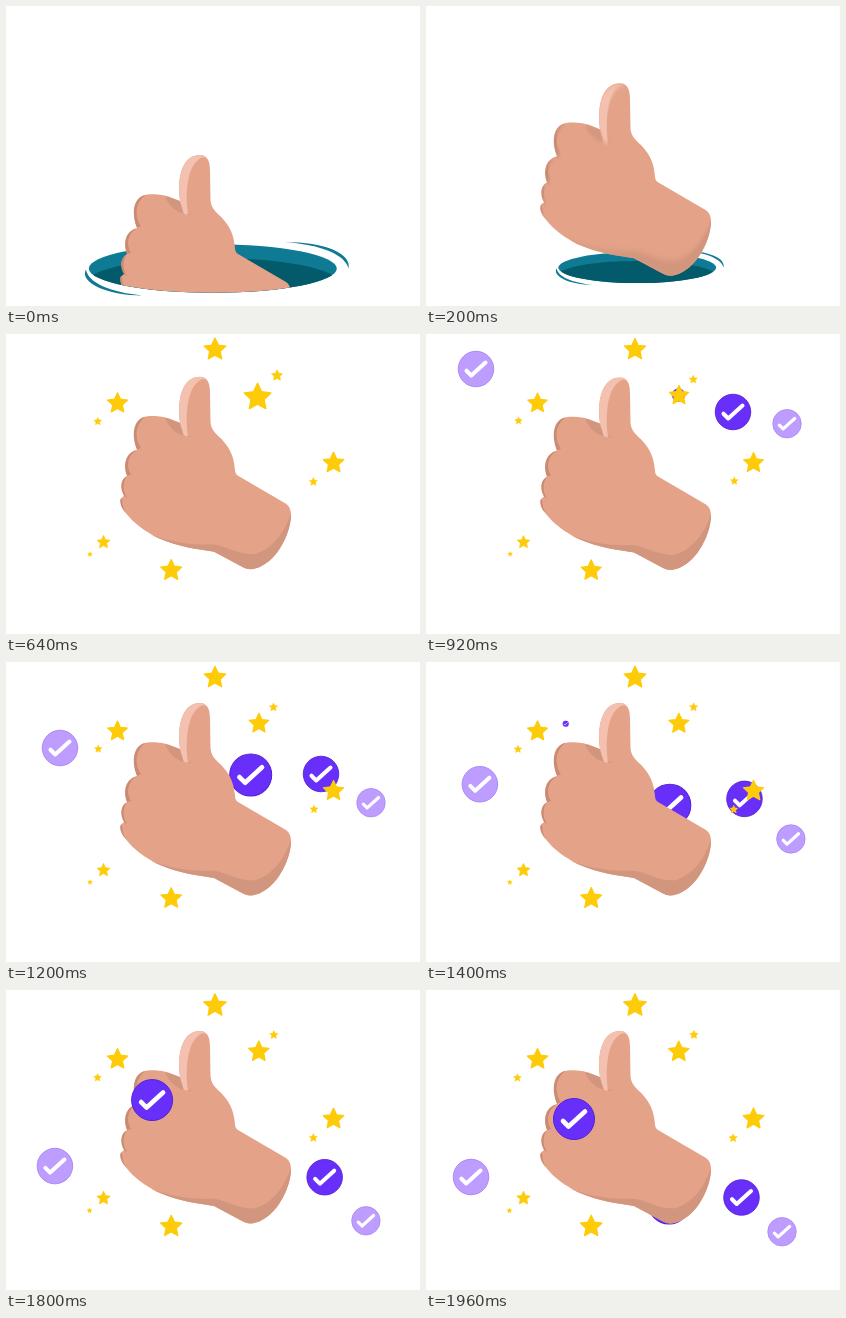
Recreate the animation shown at these times as an HTML page. Size 414 by 300 pixels, loop 2 s.

```html
<!DOCTYPE html>
<html lang="en">
<head>
<meta charset="utf-8">
<title>Thumbs up</title>
<style>
  html, body { margin: 0; width: 100%; height: 100%; overflow: hidden; background: #fff; }
  svg { display: block; width: 414px; height: 300px; }
  .star { fill: #fecb08; stroke: #fecb08; stroke-width: .1; stroke-linejoin: round; }
  .dark { fill: #692ffa; stroke: #5521d6; }
  .light { fill: #bd9dff; stroke: #a87ff3; }
  .tick { fill: none; stroke: #fff; stroke-width: 4.6; stroke-linecap: round; stroke-linejoin: round; }
</style>
</head>
<body>
<svg viewBox="0 0 414 300">
  <defs>
    <clipPath id="mouth">
      <rect width="414" height="262"/>
      <ellipse id="mouthRim" cx="206.8" cy="262.5" rx="124" ry="24.3"/>
    </clipPath>
    <clipPath id="inside"><ellipse cx="206.8" cy="262.5" rx="124" ry="24.3"/></clipPath>
    <path id="skin" d="M174 87C171 66 175 41 194 41C202 41 204 48 204 57L204.500 86
      C205 96 212 99 217 105C226 115 228 124 229 134Q229 138 232 140L280 168Q285 171 285 180
      C284 202 268 228 250 232.500Q243 235 237 231.500L208 216C192 213 174 212 151.500 202
      C140 196 128 188 120 177.500Q113 170 114.500 163L118 160C114 153 114 144 121 140
      C117 130 119 117 131 114C126 102 126 86 137 81.500C145 79 158 81 164 83Z"/>
    <clipPath id="within"><use href="#skin"/></clipPath>
    <filter id="blur" x="-5%" y="-10%" width="110%" height="120%" color-interpolation-filters="sRGB">
      <feGaussianBlur id="blurAmount" stdDeviation="0 0"/>
    </filter>
  </defs>

  <g id="hole">
    <g clip-path="url(#inside)">
      <rect x="80" y="236" width="254" height="52" fill="#0e7a94"/>
      <ellipse cx="206.5" cy="276" rx="125" ry="24" fill="#035a6b"/>
    </g>
    <g fill="#0e7a94">
      <path d="M278 236C320 236 346 248 342.500 262.500C339 248 314 238.500 278 236Z"/>
      <path d="M80 263.500C73 276 100 289.500 137 289.500C105 286.500 82 277 80 263.500Z"/>
    </g>
  </g>

  <g id="back"></g>
  <g id="stars"></g>

  <g clip-path="url(#mouth)">
    <g id="hand">
      <use href="#skin" fill="#e4a388"/>
      <g clip-path="url(#within)">
        <g id="shading">
          <g fill="#d2967e">
            <path d="M140 197C163 206 184 210 205 208.500C219 209 231 219 248 218.500
              C267 214 280 194 285 177L292 200L250 240L237 235L208 219L151 205Z"/>
            <path d="M159 82L174 87L178 99L188 101C172 101 163 93 159 82Z"/>
          </g>
          <g fill="#c98b74">
            <path d="M140 80.500C126 84 126 102 131 114L135 112C129 104 128 89 140 80.500Z"/>
            <path d="M131 114C119 117 117 130 121 140L125 139C120 131 121 120 131 114Z"/>
            <path d="M121 140C114 144 114 153 118 160L121 162C116 154 117 146 121 140Z"/>
            <path d="M114.500 163Q113 170 120 177.500C117 172 116 168 116.500 164Z"/>
          </g>
          <path fill="#f4c0af" d="M194 41C175 41 171 66 174 87L177.500 99Q179 101 182 100.500
            C179 80 181 52 194 44.500Q198 42 201 45Q199 41 194 41Z"/>
        </g>
      </g>
    </g>
  </g>

  <g id="front"></g>
</svg>
<script>
const LOOP = 2000, STEP = 40;
const $ = id => document.getElementById(id);
const clamp = p => Math.min(1, Math.max(0, p));
const span = (t, a, b) => clamp((t - a) / (b - a));
const swing = p => (1 - Math.cos(Math.PI * p)) / 2;
const mix = (a, b, p) => a + (b - a) * p;

function add(parent, tag, attrs) {
  const el = document.createElementNS('http://www.w3.org/2000/svg', tag);
  for (const k in attrs) el.setAttribute(k, attrs[k]);
  return parent.appendChild(el);
}

const place = (el, x, y, s) => {
  el.setAttribute('transform', `translate(${x} ${y}) scale(${s})`);
  el.setAttribute('visibility', s > 0.01 ? 'visible' : 'hidden');
};

// Smooth curve through keys of [time, x, y]
function along(keys, t) {
  const last = keys.length - 1;
  let i = 0;
  while (i < last - 1 && t > keys[i + 1][0]) i++;
  const a = keys[i], b = keys[i + 1], d = b[0] - a[0];
  const p = clamp((t - a[0]) / d);
  const slope = (j, k) => {
    const l = keys[Math.max(0, j - 1)], r = keys[Math.min(last, j + 1)];
    return (r[k] - l[k]) / (r[0] - l[0]) * d;
  };
  return [1, 2].map(k => {
    const m = slope(i, k), n = slope(i + 1, k), h = b[k] - a[k];
    return a[k] + p * (m + p * (3 * h - 2 * m - n + p * (m + n - 2 * h)));
  });
}

// Stars: pivot, pop start, overshoot, then [x, y, radius] of each
const starShape = Array.from({ length: 10 }, (_, i) => {
  const a = Math.PI * (i / 5 - 0.5), r = i % 2 ? 0.45 : 0.93;
  return (r * Math.cos(a)).toFixed(3) + ',' + (r * Math.sin(a)).toFixed(3);
}).join(' ');

const groups = [
  { x: 111.5, y: 69.3, start: 480, over: 1.04, stars: [[0, 0, 11], [-19, 17.5, 4.2]] },
  { x: 209, y: 15.6, start: 510, over: 1.03, stars: [[0, 0, 12]] },
  { x: 257, y: 56.5, start: 540, over: 1.36, stars: [[-4, 5, 11], [10.3, -11, 4.6]] },
  { x: 327.5, y: 129, start: 500, over: 1.05, stars: [[0, 0, 11.2], [-19.2, 18, 4.4]] },
  { x: 97.5, y: 208.3, start: 480, over: 1.02, stars: [[0, 0, 7.2], [-13.3, 11.7, 2.8]] },
  { x: 165.2, y: 236.5, start: 500, over: 1.03, stars: [[0, 0, 11.5]] }
];
for (const g of groups) {
  g.el = add($('stars'), 'g', {});
  for (const [x, y, r] of g.stars)
    add(g.el, 'polygon', { class: 'star', points: starShape, transform: `translate(${x} ${y}) scale(${r})` });
}

function starScale(g, t) {
  const peak = g.start + 100;
  if (t < peak) return g.over * swing(span(t, g.start, peak));
  if (t < 920) return mix(g.over, 1, swing(span(t, peak + 20, 860)));
  return mix(1, 1.06, span(t, 920, 1960));
}

// Badges
const drift = (x, y) => [[760, -4, -29], [920, 0, 0], [1200, 4, 51], [1640, 2, 126], [1960, -5, 152]]
  .map(([t, dx, dy]) => [t, x + dx, y + dy]);

const badges = [
  { kind: 'light', r: 18.2, start: 740, keys: drift(50, 35) },
  { kind: 'light', r: 14.6, start: 760, keys: drift(361, 89.7) },
  { kind: 'dark', r: 18.2, start: 740, keys: [[760, 301, 59], [920, 307, 78], [1200, 315, 112], [1640, 320.5, 167], [1960, 315.5, 207.5]] },
  { kind: 'dark', r: 21.5, start: 860, keys: [[840, 254, 46], [920, 252.5, 61], [1200, 244.7, 113], [1640, 244, 176], [1960, 243, 213]] },
  { kind: 'dark', r: 21, start: 1360, front: true, keys: [[1360, 139, 57], [1640, 144, 91], [1960, 148, 129]] }
];
for (const b of badges) {
  b.el = add($(b.front ? 'front' : 'back'), 'g', {});
  add(b.el, 'circle', { class: b.kind, r: 20.5 });
  add(b.el, 'path', { class: 'tick', d: 'M-11 2L-5.500 7.500L11 -7.500' });
}

// Hand: rise past the top, fall back, settle
function handY(t) {
  if (t < 390) return mix(108, -30, swing(t / 390));
  if (t < 680) return mix(-30, 3.3, swing(span(t, 390, 680)));
  return mix(3.3, 0, swing(span(t, 800, 1160)));
}

function draw(t) {
  const size = 1 - Math.pow(span(t, 0, 400), 1.46);
  const shrink = `translate(219 260) scale(${size}) translate(-219 -260)`;
  $('hole').setAttribute('transform', shrink);
  $('hole').setAttribute('visibility', size > 0.01 ? 'visible' : 'hidden');
  $('mouthRim').setAttribute('transform', shrink);
  // The opening no longer hides anything once it has closed
  $('mouth').firstElementChild.setAttribute('height', t < 320 ? 262 : 300);

  $('hand').setAttribute('transform', `translate(0 ${handY(t)})`);
  // Fast movement softens the shading
  const speed = Math.abs(handY(t + 5) - handY(Math.max(0, t - 5))) / 10;
  const shading = $('shading');
  if (speed > 0.06) {
    shading.setAttribute('filter', 'url(#blur)');
    $('blurAmount').setAttribute('stdDeviation', `0 ${speed * 5}`);
  } else {
    shading.removeAttribute('filter');
  }

  for (const g of groups) place(g.el, g.x, g.y, starScale(g, t));
  for (const b of badges) {
    const [x, y] = along(b.keys, t);
    place(b.el, x, y, b.r / 21 * swing(span(t, b.start, b.start + 160)));
  }
}

const began = performance.now();
function tick() {
  const t = (performance.now() - began) % LOOP;
  draw(Math.floor(t / STEP) * STEP);
  requestAnimationFrame(tick);
}
tick();
</script>
</body>
</html>
```
